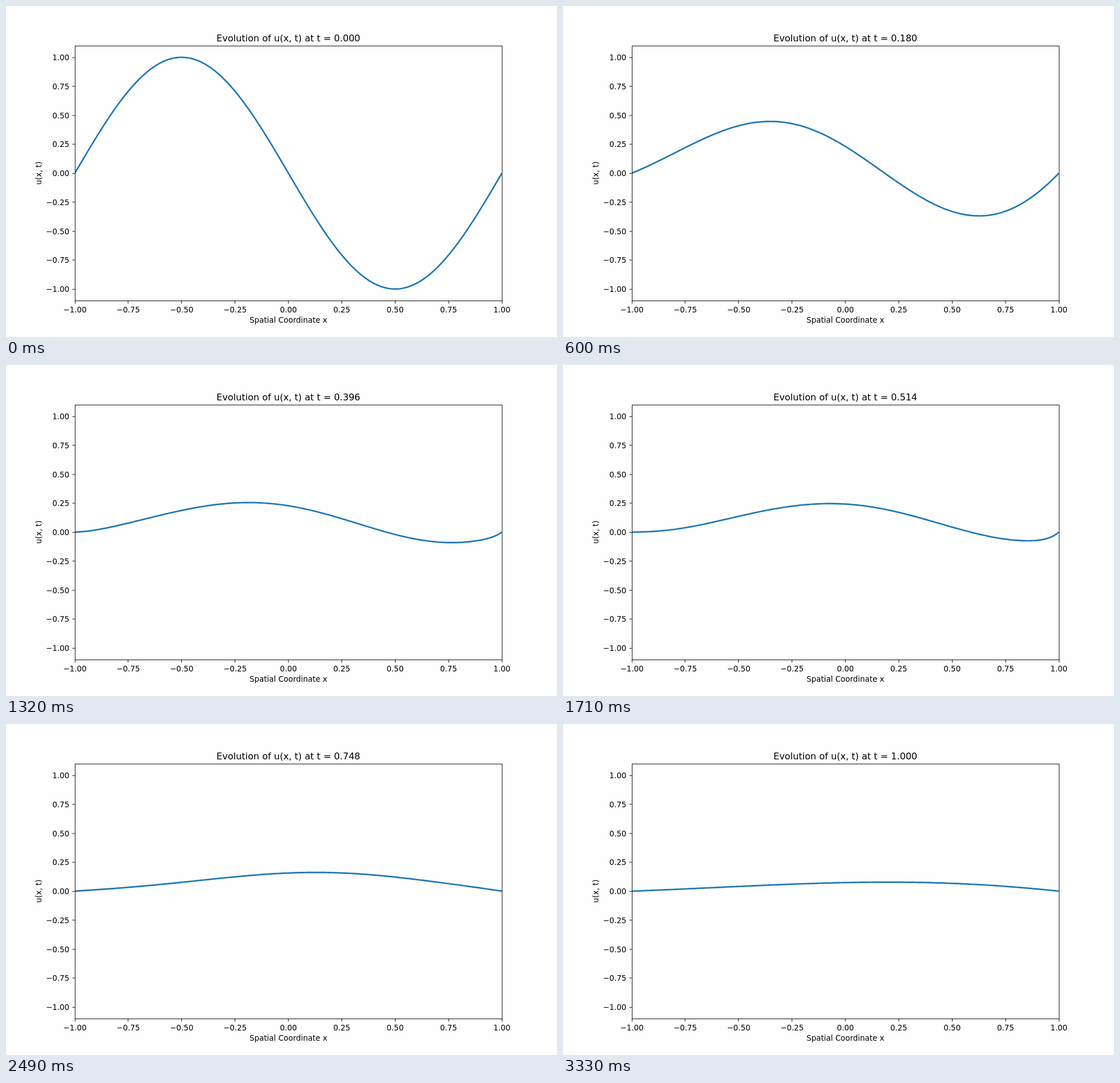
An HTML page with a canvas that plays this animation: 966 by 580 pixels, repeating every 3.36 s.

```html
<!DOCTYPE html>
<html>
<head>
<meta charset="utf-8">
<style>
html, body { margin: 0; width: 100%; height: 100%; overflow: hidden; background: #fefefe; }
canvas { display: block; }
</style>
</head>
<body>
<canvas id="stage" width="966" height="580"></canvas>
<script>
const ctx = document.getElementById('stage').getContext('2d');
const STEPS = 111, FRAME_MS = 30, CELLS = 200;
// The chart is laid out on a 1000 x 600 sheet and scaled to the stage
const BOX = { left: 125, top: 72, width: 775, height: 462 };
const BOTTOM = BOX.top + BOX.height;

const toX = x => BOX.left + (x + 1) / 2 * BOX.width;
const toY = u => BOX.top + BOX.height / 2 - u * BOX.height / 2.2;
const gridX = i => 2 * i / CELLS - 1;
const snap = v => Math.floor(v) + 0.5;
const viscosity = t => t < 0.33 ? 0.5 : t < 0.66 ? 0.05 : 1;

// One step of u_t + u_x = nu u_xx with u = 0 at both ends:
// upwind explicit advection, implicit diffusion
function advance(u, nu) {
  const dt = 1 / STEPS, dx = 2 / CELLS;
  const spread = nu * dt / dx ** 2;
  const c = [0], d = [0], next = Array(CELLS + 1).fill(0);
  for (let i = 1; i < CELLS; i++) {
    const moved = u[i] - dt / dx * (u[i] - u[i - 1]);
    const pivot = 1 + 2 * spread + spread * c[i - 1];
    c[i] = -spread / pivot;
    d[i] = (moved + spread * d[i - 1]) / pivot;
  }
  for (let i = CELLS - 1; i > 0; i--) next[i] = d[i] - c[i] * next[i + 1];
  return next;
}

const states = [Array.from({ length: CELLS + 1 }, (_, i) => -Math.sin(Math.PI * gridX(i)))];
for (let n = 0; n < STEPS; n++) states.push(advance(states[n], viscosity(n / STEPS)));

function text(str, x, y, align = 'center', size = 13.89) {
  ctx.font = `${size}px "DejaVu Sans", sans-serif`;
  ctx.textAlign = align;
  ctx.fillText(str, x, y);
}

function line(x1, y1, x2, y2) {
  ctx.beginPath();
  ctx.moveTo(x1, y1);
  ctx.lineTo(x2, y2);
  ctx.stroke();
}

function drawAxes() {
  ctx.strokeStyle = ctx.fillStyle = '#000';
  ctx.lineWidth = 1;
  ctx.strokeRect(snap(BOX.left), snap(BOX.top), BOX.width, BOX.height);
  for (let v = -1; v <= 1; v += 0.25) {
    const label = v.toFixed(2).replace('-', '\u2212'), x = toX(v), y = toY(v);
    line(snap(x), BOTTOM, snap(x), BOTTOM + 5.5);
    line(BOX.left - 4.5, snap(y), BOX.left, snap(y));
    text(label, x, 555);
    text(label, 115, y + 5.5, 'right');
  }
  text('Spatial Coordinate x', toX(0), 574);
  ctx.save();
  ctx.translate(64, toY(0));
  ctx.rotate(-Math.PI / 2);
  text('u(x, t)', 0, 0);
  ctx.restore();
}

function drawCurve(u) {
  ctx.save();
  ctx.beginPath();
  ctx.rect(BOX.left, BOX.top, BOX.width, BOX.height);
  ctx.clip();
  ctx.beginPath();
  u.forEach((value, i) => ctx.lineTo(toX(gridX(i)), toY(value)));
  ctx.strokeStyle = '#1f77b4';
  ctx.lineWidth = 2.78;
  ctx.lineJoin = 'round';
  ctx.stroke();
  ctx.restore();
}

function render(now) {
  const n = Math.floor(now / FRAME_MS) % (STEPS + 1);
  ctx.setTransform(966 / 1000, 0, 0, 580 / 600, 0, 0);
  ctx.fillStyle = '#fefefe';
  ctx.fillRect(0, 0, 1000, 600);
  drawCurve(states[n]);
  drawAxes();
  text(`Evolution of u(x, t) at t = ${(n / STEPS).toFixed(3)}`, toX(0), 64, 'center', 16.67);
  requestAnimationFrame(render);
}
requestAnimationFrame(render);
</script>
</body>
</html>
```
